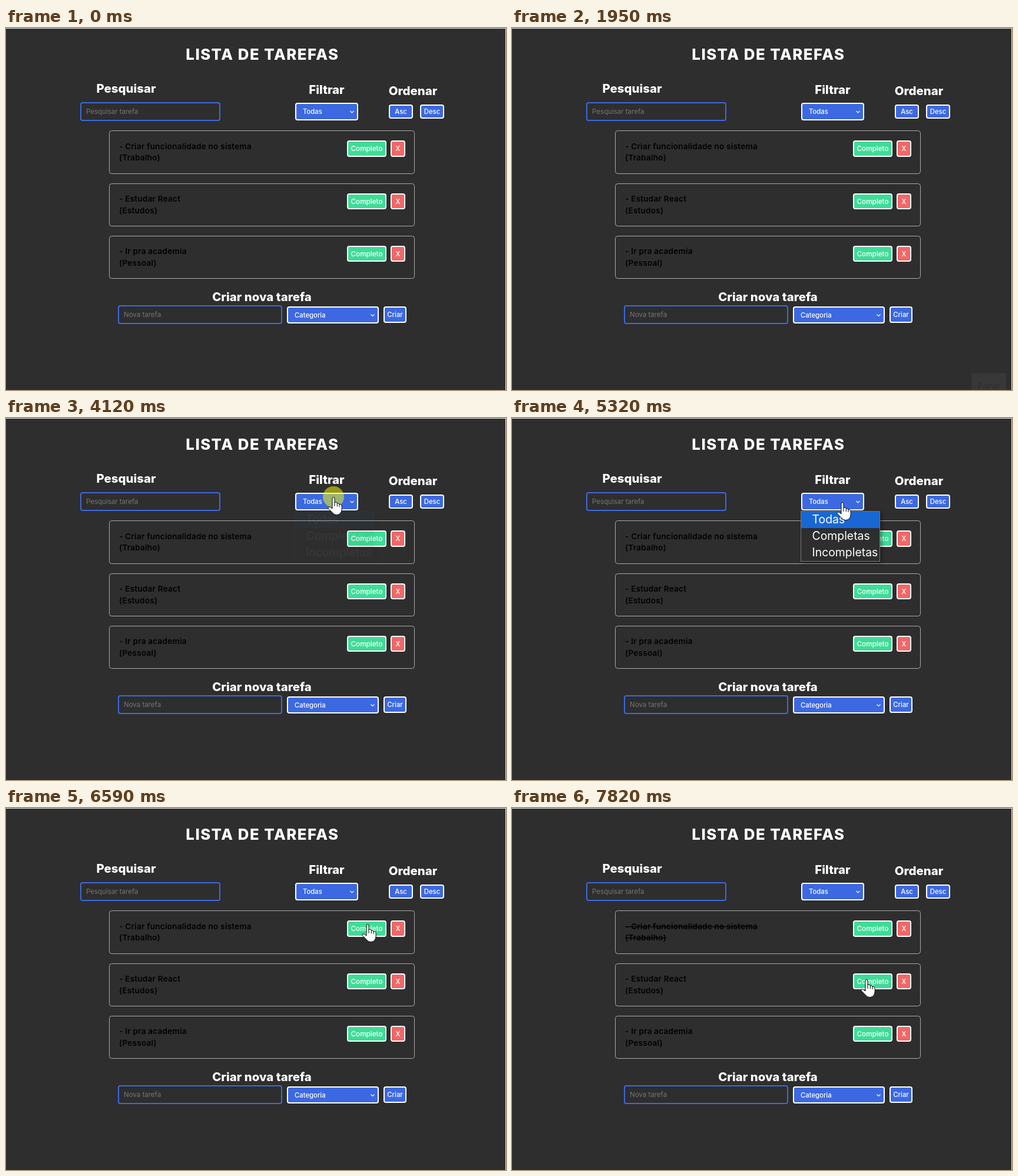
An HTML page for the animation above (8000 ms loop, 849x615 px).

```html
<!DOCTYPE html>
<html lang="pt">
<head>
<meta charset="utf-8">
<style>
  html, body { margin: 0; width: 100%; height: 100%; overflow: hidden; background: #2e2e2e; }
  svg { display: block; width: 849px; height: 615px; font-family: Inter, sans-serif; }
  #menu { filter: drop-shadow(3px 2px 3px rgba(0, 0, 0, .4)); }
  .done { text-decoration: line-through; }
</style>
</head>
<body>
<svg id="stage" viewBox="0 0 849 615"></svg>
<script>
const BG = '#2e2e2e', BLUE = '#3c69e1', GREEN = '#3edc97', RED = '#f26767';
const LOOP = 8000;

// Rectangle given by its outer edge, with the border drawn inside
const box = (x, y, w, h, fill, stroke = '#fff', line = 2, radius = 3) =>
  `<rect x="${x + line / 2}" y="${y + line / 2}" width="${w - line}" height="${h - line}"
    rx="${radius}" fill="${fill}" stroke="${stroke}" stroke-width="${line}"/>`;
const text = (x, y, size, weight, str, fill = '#fff', extra = '') =>
  `<text x="${x}" y="${y}" font-size="${size}" font-weight="${weight}" fill="${fill}" ${extra}>${str}</text>`;
const centered = 'text-anchor="middle"';
const heading = (x, y, str) => text(x, y, 20.4, 800, str, '#fff', centered);
const button = (x, y, w, h, fill, str, size = 11.3) =>
  box(x, y, w, h, fill) + text(x + w / 2, y + h / 2 + 4, size, 500, str, '#fff', centered);
const input = (x, y, w, str) =>
  box(x, y, w, 32, BG, BLUE) + text(x + 10, y + 20, 11.5, 400, str, '#757575');
const select = (x, y, w, h, str) =>
  box(x, y, w, h, BLUE) + text(x + 13, y + h / 2 + 4, 11.3, 500, str) +
  `<path d="M${x + w - 13.5} ${y + h / 2 - 1}l3 3 3-3" fill="none" stroke="#fff" stroke-width="1.2"/>`;

const tasks = [
  ['Criar funcionalidade no sistema', 'Trabalho'],
  ['Estudar React', 'Estudos'],
  ['Ir pra academia', 'Pessoal']
];
// Cards repeat at a fractional pitch, each edge snapped to a whole pixel
const rowY = (y, i) => Math.round(y + i * 89.3);
const taskCard = ([title, category], i) => {
  const label = (y, str) =>
    text(192, rowY(y, i), 13.5, 600, str, '#000', 'letter-spacing=".26"');
  const top = rowY(174.4, i), buttonTop = rowY(191.4, i);
  const buttonHeight = rowY(218.7, i) - buttonTop;
  return box(175, top, 519, rowY(247.7, i) - top, 'none', '#aaa', 1, 4) +
    `<g id="task${i}">${label(205.5, '- ' + title)}${label(225.4, `(${category})`)}</g>` +
    button(579, buttonTop, 67, buttonHeight, GREEN, 'Completo', 11.7) +
    button(653, buttonTop, 25, buttonHeight, RED, 'X');
};

const menu = `<g id="menu">
  ${box(490, 158, 135, 86, BG, '#767676', 1, 0)}
  <path d="M491 159h133v28H491z" fill="#1967d2"/>
  ${['Todas', 'Completas', 'Incompletas'].map((s, i) => text(509.5, 179 + i * 28, 19.4, 400, s)).join('')}
</g>`;

const stage = document.getElementById('stage');
stage.innerHTML = `
  <rect width="849" height="615" fill="${BG}"/>
  <path d="M0 .5H848.5V615" fill="none" stroke="#eee"/>
  ${text(435.5, 54, 25.8, 800, 'LISTA DE TAREFAS', '#fff', centered + ' letter-spacing="1.5"')}
  ${heading(204, 110, 'Pesquisar')}
  ${heading(544.5, 112, 'Filtrar')}
  ${heading(691, 114, 'Ordenar')}
  ${input(126, 126, 238, 'Pesquisar tarefa')}
  ${select(491, 127, 107, 30, 'Todas')}
  ${button(650, 130, 41, 24, BLUE, 'Asc')}
  ${button(703, 130, 41, 24, BLUE, 'Desc')}
  ${tasks.map(taskCard).join('')}
  ${heading(434.5, 464, 'Criar nova tarefa')}
  ${input(190, 471, 279, 'Nova tarefa')}
  ${select(477, 473, 156, 29, 'Categoria')}
  ${button(641, 473, 39, 28, BLUE, 'Criar')}
  ${menu}
  <g id="tip">
    ${box(780, 586, 59, 40, '#f4f4f4', '#bbb', 1, 0)}
    ${text(789.5, 614, 16.2, 400, 'Parar', '#222', 'font-family="Open Sans, sans-serif"')}
  </g>
  <circle id="click" r="18" fill="#ff0" fill-opacity=".5"/>
  <g id="pointer" fill="#fff" stroke="#000" stroke-linejoin="round">
    <path id="arrow" d="M.5 .5V23.5L6 18.5 10 27.5 14 25.8 10.3 17.2H17.5Z"/>
    <g id="hand" transform="translate(-10 0)">
      <path d="M8 3Q8 .5 10 .5T12 3V10Q12.5 8.8 14.4 9 16 9.3 16.3 11 18.6 10.3 20 12.5
        23.6 12 24.2 16V21Q24 25 22 27.5 20 30.5 15.5 30.5 11 30.5 9 27.5L1.2 19.5Q.2 17.5 2 16.8
        4 16.3 8 20Z"/>
      <path d="M12 9.5V16M16.3 11V16.5M20 12.5V17" fill="none"/>
    </g>
  </g>`;

// Pointer travel: first step, last step, number of steps, destination
const START = [807, 199];
const moves = [
  [2290, 2420, 3, 800, 198],
  [3040, 3290, 5, 732, 194],
  [3360, 3840, 8, 556, 139],
  [3900, 3970, 2, 556, 134],
  [4510, 4650, 3, 557, 149],
  [5190, 5250, 2, 561, 143],
  [6170, 6590, 7, 614, 197],
  [7470, 7820, 6, 602, 291]
];
const clickTimes = [[4050, 4180], [5390, 5460], [6730, 6870]];
const tipLevels = [[1260, .5], [1330, 1], [1810, .6], [1880, .3], [1950, .05], [2290, 0]];
const menuLevels = [[4120, .05], [4180, 1], [5390, .5], [5460, 0]];

const level = (levels, t) => levels.reduce((value, [at, next]) => t >= at ? next : value, 0);
const within = (t, [from, to]) => t >= from && t < to;
const smooth = p => p * p * (3 - 2 * p);

function pointerAt(t) {
  let [x, y] = START;
  for (const [from, to, steps, endX, endY] of moves) {
    if (t < from) break;
    const step = Math.min(steps, Math.floor((t - from) / (to - from) * (steps - 1) + 1e-6) + 1);
    const p = smooth(step / steps);
    x += (endX - x) * p;
    y += (endY - y) * p;
  }
  return [Math.round(x), Math.round(y)];
}

const hotspots = [[491, 127, 107, 30], ...tasks.map((_, i) => [579, rowY(191.4, i), 67, 28])];
const clickable = (x, y) =>
  hotspots.some(([left, top, w, h]) => x >= left && x <= left + w && y >= top && y <= top + h);

const part = id => document.getElementById(id);
const show = (id, visible) => part(id).setAttribute('visibility', visible ? 'visible' : 'hidden');

function render(t) {
  const leaving = within(t, [1880, 1950]);
  const [x, y] = leaving ? [805, 542] : pointerAt(t);
  const visible = leaving || t >= 2290;
  const over = clickable(x, y);
  const place = `translate(${x} ${y})`;
  part('pointer').setAttribute('transform', place);
  part('click').setAttribute('transform', place);
  show('arrow', visible && !over);
  show('hand', visible && over);
  show('click', clickTimes.some(span => within(t, span)));
  part('tip').setAttribute('opacity', level(tipLevels, t));
  part('menu').setAttribute('opacity', level(menuLevels, t));
  part('task0').setAttribute('class', t >= 6870 ? 'done' : '');
}

const begin = performance.now();
function tick() {
  render((performance.now() - begin) % LOOP);
  requestAnimationFrame(tick);
}
tick();
</script>
</body>
</html>
```
